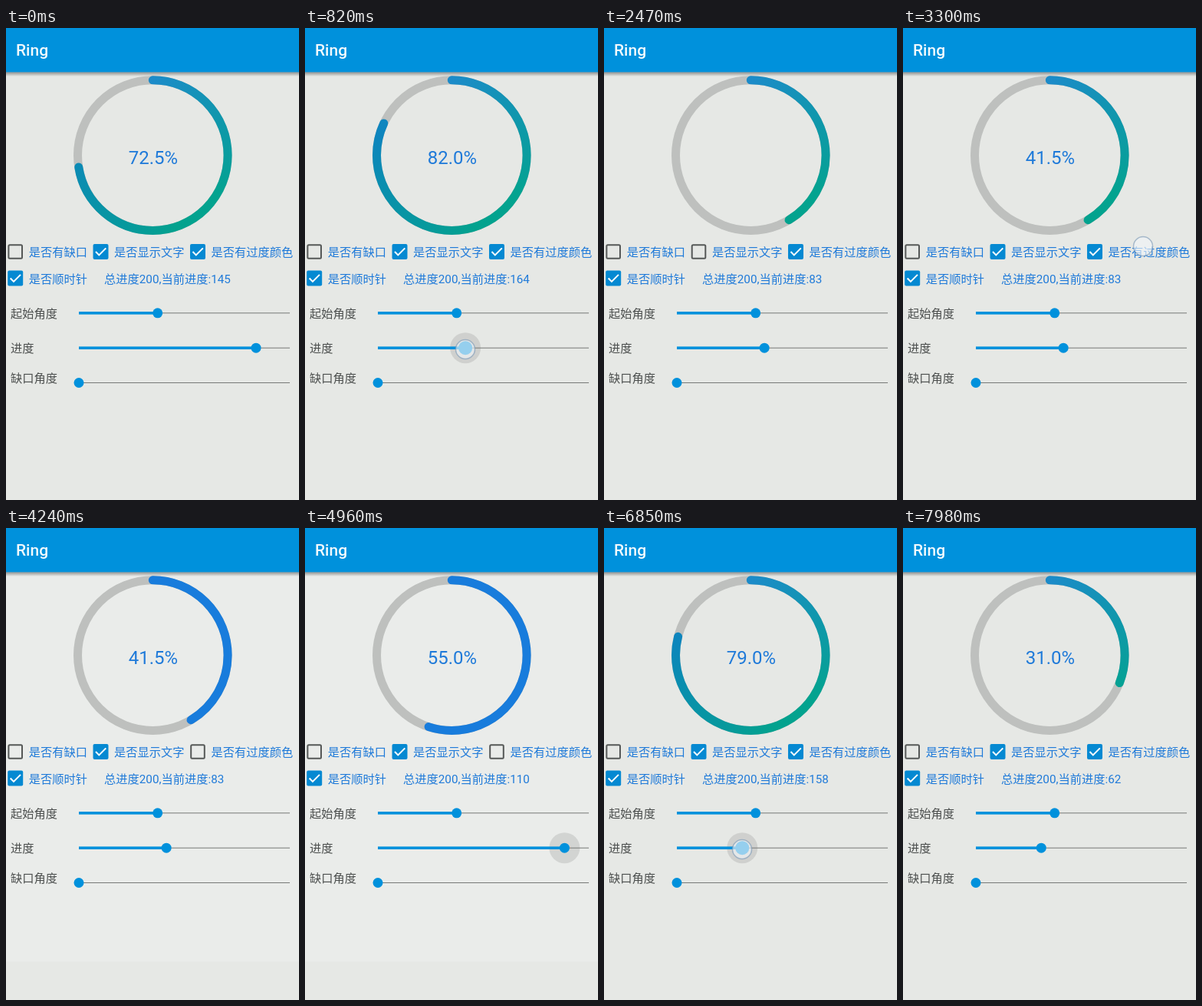
An HTML page with a canvas that plays this animation: 382x614 px, repeating every 8 s.

```html
<!DOCTYPE html>
<html lang="zh-CN">
<head>
<meta charset="utf-8">
<title>Ring</title>
<style>
html, body { margin: 0; width: 100%; height: 100%; overflow: hidden; background: #e6e8e5; }
canvas { display: block; }
</style>
</head>
<body>
<canvas id="stage" width="382" height="614"></canvas>
<script>
const g = document.getElementById('stage').getContext('2d');
const LOOP = 8000, TAU = Math.PI * 2;
const BLUE = '#0091dc', INK = '#1f7ad9', GREY = '#4c4f4e';
const CX = 191.3, CY = 165.6, R = 97.8;
const FONT = 'Roboto, "Noto Sans CJK SC", "Noto Sans CJK", sans-serif';

const runs = [[150, 1120, 8], [1240, 2170, 8], [2320, 3300, 8], [3460, 4380, 8],
  [4540, 5580, 9], [5700, 6700, 8], [6850, 7850, 8], [7980, 7980, 1]];
const ticks = [0];
for (const [a, b, n] of runs)
  for (let i = 0; i < n; i++) ticks.push(n > 1 ? a + (b - a) * i / (n - 1) : a);

// Progress changes: start time, old value, new value.
const moves = [[-605, 100, 168], [570, 168, 83], [4570, 83, 177], [6583.5, 177, 62]];
// Finger contacts: down, up, x, y.
const taps = [[540, 800, 209, 418], [1760, 1895, 169, 288], [2560, 2700, 169, 288],
  [3290, 3440, 313, 284], [4530, 4870, 338, 418], [5830, 6110, 317, 286], [6570, 6900, 180, 418]];

const between = (t, a, b) => t >= a && t < b;

function progressAt(t) {
  const [start, from, to] = moves.filter(m => m[0] <= t).pop();
  const p = Math.min(1, (t - start) / 1000);
  return { target: to, value: Math.round(from + (to - from) * (1 - Math.cos(Math.PI * p)) / 2) };
}

function text(s, x, y, size = 15.25, color = INK, weight = 400) {
  g.font = `${weight} ${size}px ${FONT}`;
  g.fillStyle = color;
  g.fillText(s, x, y);
}

function disc(x, y, r, color) {
  g.fillStyle = color;
  g.beginPath();
  g.arc(x, y, r, 0, TAU);
  g.fill();
}

function line(x1, x2, y, width, color) {
  g.fillStyle = color;
  g.fillRect(x1, y - width / 2, x2 - x1, width);
}

function arc(sweep, color) {
  g.lineWidth = 11;
  g.lineCap = 'round';
  g.strokeStyle = color;
  g.beginPath();
  g.arc(CX, CY, R, -TAU / 4, sweep - TAU / 4);
  g.stroke();
}

function ring(value, shaded, showText) {
  let color = '#187cdc';
  if (shaded) {
    color = g.createConicGradient(-TAU / 4, CX, CY);
    [[0, '#1c8bc9'], [.34, '#03a38f'], [.45, '#03a28e'], [.79, '#0d85bd'], [1, '#1c8bc9']]
      .forEach(stop => color.addColorStop(...stop));
  }
  arc(TAU, '#bec0be');
  arc(TAU * value / 200, color);
  if (showText) {
    g.textAlign = 'center';
    text((value / 2).toFixed(1) + '%', 192, 177, 24);
    g.textAlign = 'left';
  }
}

function checkbox(x, y, on, label) {
  g.lineWidth = 2;
  g.lineCap = 'butt';
  g.beginPath();
  if (on) {
    g.fillStyle = '#0589d2';
    g.roundRect(x - 10, y - 10, 20, 20, 2);
    g.fill();
    g.strokeStyle = '#fff';
    g.beginPath();
    g.moveTo(x - 6.5, y);
    g.lineTo(x - 2.2, y + 4.4);
    g.lineTo(x + 6.8, y - 4.6);
  } else {
    g.strokeStyle = '#555857';
    g.roundRect(x - 8.8, y - 8.8, 17.6, 17.6, 1.5);
  }
  g.stroke();
  text(label, x + 17.6, y + 6);
}

function slider(y, labelY, label, x, halo, pressed) {
  text(label, 6, labelY, 15.25, GREY);
  if (halo) disc(x, y, 20, 'rgba(0,0,0,.1)');
  line(95, 370, y, 1, '#777977');
  line(95, x, y, 3.6, BLUE);
  disc(x, y, pressed ? 9 : 6.5, BLUE);
}

function finger(x, y) {
  disc(x, y, 12.5, 'rgba(240,245,248,.62)');
  g.lineWidth = 1.5;
  g.strokeStyle = 'rgba(120,150,180,.6)';
  g.stroke();
}

function header() {
  g.fillStyle = BLUE;
  g.fillRect(0, 0, 382, 57.5);
  const shade = g.createLinearGradient(0, 57, 0, 63);
  shade.addColorStop(0, 'rgba(0,0,0,.4)');
  shade.addColorStop(1, 'rgba(0,0,0,0)');
  g.fillStyle = shade;
  g.fillRect(0, 57.5, 382, 6);
  text('Ring', 13, 36, 21, '#f4fafd', 500);
}

function draw(now) {
  const clock = now % LOOP;
  const t = ticks.filter(k => k <= clock).pop();
  const { target, value } = progressAt(t);
  const shaded = !between(t, 3440, 6110);
  const showText = !between(t, 1895, 2700);
  const tap = taps.find(([a, b]) => between(t, a, b));
  const halo = taps.some(([a, b, , y]) => y > 400 && between(t, a, b + 110));

  g.fillStyle = '#e6e8e5';
  g.fillRect(0, 0, 382, 614);
  if (!shaded) {
    g.fillStyle = '#eaecea';
    g.fillRect(0, 0, 382, 564);
  }
  header();
  ring(value, shaded, showText);

  checkbox(12.2, 291, false, '是否有缺口');
  checkbox(123.5, 291, showText, '是否显示文字');
  checkbox(250, 291, shaded, '是否有过度颜色');
  checkbox(12.2, 325.5, true, '是否顺时针');
  text(`总进度200,当前进度:${value}`, 128, 331.5);

  slider(370.8, 377, '起始角度', 197.7);
  slider(416.2, 422, '进度', 95 + 275 * target / 200, halo, tap && tap[3] > 400);
  slider(461.5, 460.7, '缺口角度', 95);
  if (tap) finger(tap[2], tap[3]);
}

const begin = performance.now();
function loop() {
  draw(performance.now() - begin);
  requestAnimationFrame(loop);
}
loop();
</script>
</body>
</html>
```
